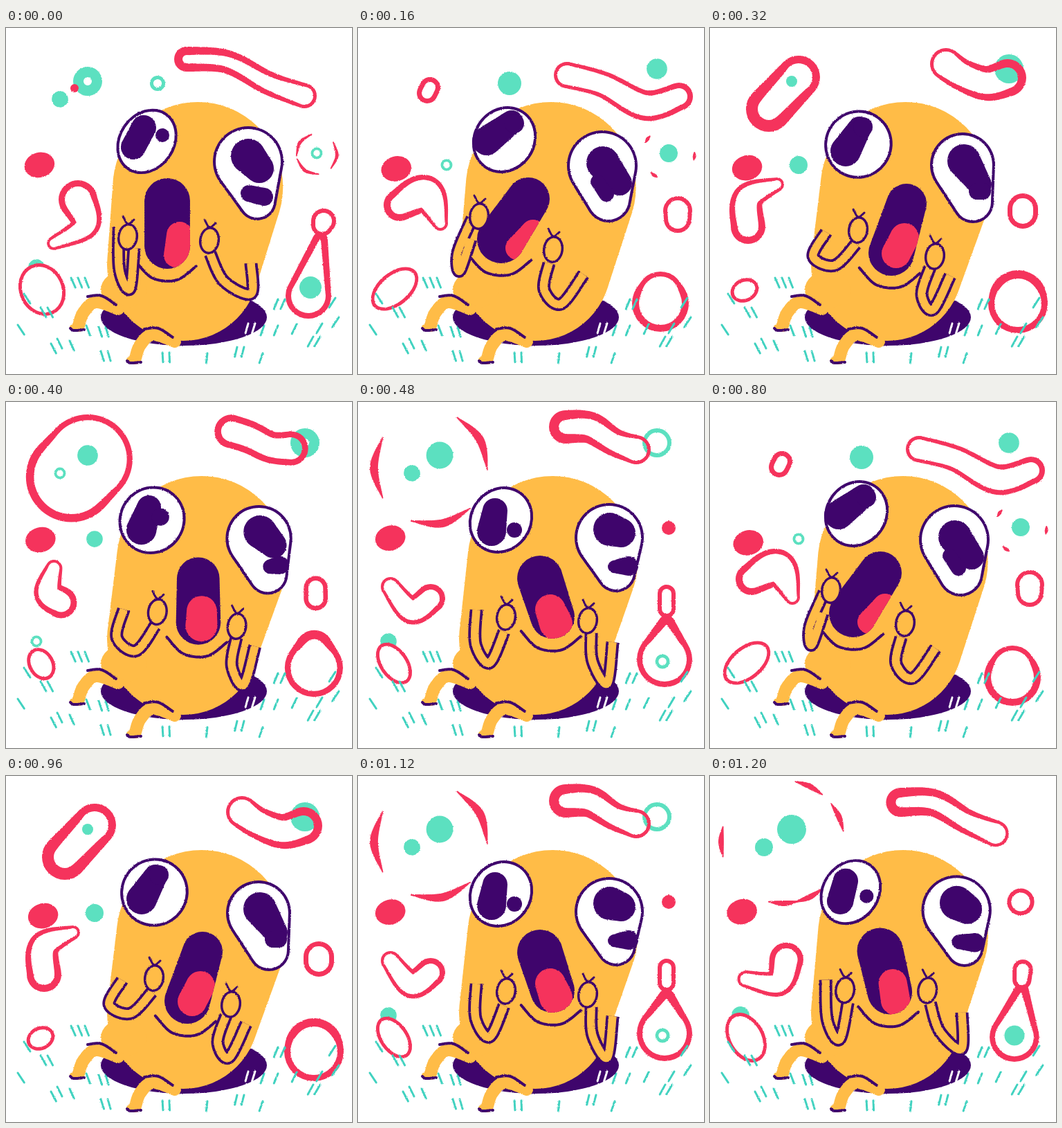
Write an HTML page with a canvas that moves like this. It is 500 px wide and 500 px high and loops after 1.28 s.

```html
<!DOCTYPE html>
<html>
<head>
<meta charset="utf-8">
<style>
html, body { margin: 0; height: 100%; overflow: hidden; background: #fff; }
canvas { display: block; filter: url(#crayon); }
svg { position: absolute; }
</style>
</head>
<body>
<svg width="0" height="0">
  <filter id="crayon" x="0" y="0" width="100%" height="100%" color-interpolation-filters="sRGB">
    <feTurbulence type="fractalNoise" baseFrequency=".7" seed="4"/>
    <feDisplacementMap in="SourceGraphic" scale="2.5" xChannelSelector="R" yChannelSelector="G"/>
  </filter>
</svg>
<canvas width="500" height="500"></canvas>
<script>
const ctx = document.querySelector('canvas').getContext('2d');
const YELLOW = '#ffbc47', PURPLE = '#3f056c', RED = '#f5335c', TEAL = '#5ce0c0', GRASS = '#41d2c0';
const STEP = 80, STEPS = 8, SAMPLES = 20, TAU = Math.PI * 2;
let step = 0;

const { cos, sin, floor, min, max } = Math;
const rad = deg => deg * Math.PI / 180;
const since = start => (step - start + STEPS) % STEPS;
const wave = (lag = 0) => sin((step - lag) / STEPS * TAU);
const cubic = (a, b, c, d, t) =>
  b + t / 2 * (c - a + t * (2 * a - 5 * b + 4 * c - d + t * (3 * (b - c) + d - a)));

// Four key poses spread over the loop, joined by a smooth cycle
function pose(...keys) {
  const i = floor(step / 2), key = k => keys[(i + k + 3) % 4];
  return key(1).map((v, j) => cubic(key(0)[j], v, key(2)[j], key(3)[j], step % 2 / 2));
}

// Samples of a smooth curve through points of `dim` numbers each
function along(flat, dim) {
  const n = flat.length / dim, out = [];
  for (let s = 0; s <= (n - 1) * SAMPLES; s++) {
    const i = floor(s / SAMPLES), t = s % SAMPLES / SAMPLES;
    const at = (k, j) => flat[max(0, min(n - 1, i + k)) * dim + j];
    out.push(Array.from({ length: dim }, (_, j) => cubic(at(-1, j), at(0, j), at(1, j), at(2, j), t)));
  }
  return out;
}

// Circles (x, y, r) swept along a curve; the radius grows by g0 at its start and g1 at its end
function sweep(nodes, g0 = 0, g1 = g0) {
  const path = along(nodes, 3);
  ctx.beginPath();
  path.forEach(([x, y, r], i) => {
    r = max(0, r + g0 + (g1 - g0) * i / max(1, path.length - 1));
    ctx.moveTo(x + r, y);
    ctx.arc(x, y, r, 0, TAU);
  });
}
function blob(nodes, color, g0, g1) {
  sweep(nodes, g0, g1);
  ctx.fillStyle = color;
  ctx.fill();
}
function line(points, color = PURPLE, width = 4) {
  ctx.beginPath();
  along(points, 2).forEach(([x, y]) => ctx.lineTo(x, y));
  ctx.strokeStyle = color;
  ctx.lineWidth = width;
  ctx.stroke();
}
function oval(x, y, rx, ry, deg, color) {
  ctx.beginPath();
  ctx.ellipse(x, y, rx, ry, rad(deg), 0, TAU);
  ctx.fillStyle = color;
  ctx.fill();
}
function blend(mode, paint) {
  ctx.globalCompositeOperation = mode;
  paint();
  ctx.globalCompositeOperation = 'source-over';
}

// The last two numbers are the wall at either end
function ring(p) {
  const nodes = p.slice(0, -2), [w0, w1] = p.slice(-2);
  blob(nodes, RED);
  blend('destination-out', () => blob(nodes, RED, -w0, -w1));
}

// Pieces of a broken circle, thick in the middle
function shatter(cx, cy, radius, angles, span, thick) {
  for (const a of angles) {
    const node = (deg, r) => [cx + radius * cos(rad(deg)), cy + radius * sin(rad(deg)), r];
    blob([...node(a - span, 1), ...node(a, thick), ...node(a + span, 1)], RED);
  }
}

function dot(x, y, r, hole) {
  ctx.beginPath();
  ctx.arc(x, y, r, 0, TAU);
  ctx.moveTo(x + hole, y);
  ctx.arc(x, y, hole, 0, TAU);
  ctx.fillStyle = TEAL;
  ctx.fill('evenodd');
}
// Starts as a small ring, fills up and shrinks away
function bud(x, y, size, birth) {
  const age = since(birth), r = size * cos((age - 2) * .43);
  if (age < 4) dot(x, y, r, age ? 0 : r * .55);
}
// Swells, opens from the middle and is gone
function bubble(x, y, birth) {
  const age = since(birth);
  if (age && age < 7) dot(x, y, 21 * sin(min(1, age / 4) * TAU / 4), max(0, 6 + 9 * (age - 5)));
}

function drawFloaters() {
  bud(44, 346, 13, 5);
  ring(pose(
    [261,45,18, 320,49,17, 380,80,17, 431,98,18, 12,5],
    [302,68,19, 355,82,19, 415,112,22, 464,99,20, 5,8],
    [341,52,23, 365,68,23, 400,80,25, 430,72,27, 5,12],
    [300,36,24, 335,37,23, 370,58,20, 402,69,21, 14,5]));
  ring(pose(
    [454,306,11, 437,387,33, 10,8],
    [437,386,34, 437,398,41, 7,10],
    [445,392,42, 445,398,43, 12,9],
    [446,320,12, 443,372,40, 13,8]));
  ring(pose(
    [459,279,18, 457,285,16, 6,6],
    [462,264,21, 462,276,20, 6,6],
    [452,261,22, 452,268,22, 7,7],
    [446,277,13, 446,299,13, 6,6]));
  ring(pose(
    [104,248,28, 115,285,20, 69,311,10, 9,4],
    [60,256,23, 98,240,27, 119,282,11, 10,4],
    [55,287,25, 55,246,22, 97,226,10, 10,4],
    [105,284,21, 77,301,20, 47,267,14, 8,4]));
  const [x, y, rx, ry, tilt] = pose([52,378,33,39,-25], [53,377,40,24,-40], [50,379,21,17,-25], [52,378,21,34,-35]);
  oval(x, y, rx, ry, tilt, RED);
  blend('destination-out', () => oval(x, y, rx - 5, ry - 5, tilt, RED));
  oval(51 + 5 * wave(.7), 200 + 4 * wave(.7), 22, 18, -15, RED);

  if (step < 6) ring(pose(
    [99,87,6, 99,87,6, 6,6],
    [104,86,15, 100,94,15, 7,7],
    [128,71,31, 85,117,33, 11,17],
    [105,95,86, 105,95,86, 5,5]));
  else if (step === 6) shatter(105, 95, 82, [180, -30, 78], 32, 6);
  else shatter(105, 95, 89, [180, -64, -24, 64, 89], 14, 4);

  // A seed grows into a ring and falls apart
  const age = since(6), size = 42 - 32 * .7 ** age;
  if (age < 2) ring([449, 182, size, age ? 6 : size, 6]);
  else if (age < 5) shatter(449, 182, size + 3, [-145, 5, 125], 72 - 16 * age, 2.5);

  blend('destination-over', () => {
    bubble(118, 77, 3);
    bubble(432, 59, 0);
    bud(78, 103, 13, 5);
    bud(219, 80, 17, 0);
    bud(449, 181, 13, 0);
    bud(128, 198, 13, 2);
    bud(440, 375, 16, 6);
  });
}

// Blades lean towards the middle of the meadow
function tuft(x, y, count, color = GRASS) {
  for (let i = 0; i < count; i++, x += 10) line([x, y, x + (250 - x) * .04, y + 14], color, 3);
}
function drawGrass() {
  [[94,361,3], [17,429,1], [26,384,1], [50,404,2], [65,456,1], [74,449,1], [92,452,1], [116,430,1],
   [134,432,2], [137,467,2], [226,469,2], [291,470,1], [334,461,2], [371,470,1], [373,430,1],
   [393,392,2], [393,430,1], [420,428,1], [444,446,2], [457,427,1], [481,418,1], [476,390,1]]
    .forEach(t => tuft(...t));
}

function drawLeg(dx, dy) {
  ctx.save();
  ctx.translate(dx, dy);
  line([162,406, 130,396, 112,411, 105,430], YELLOW, 18);
  oval(102, 432, 10, 5, 0, YELLOW);
  line([118,388, 138,387, 159,400]);
  line([93,434, 98,437, 113,436]);
  ctx.restore();
}

function drawBody() {
  oval(257, 418, 120, 41, 0, PURPLE);
  tuft(350, 427, 2, '#fff');
  blob([280 - 3 * cos(rad(45 * step - 25)), 230, 123, 256, 342, 110], YELLOW);
  oval(170, 378, 33, 27, 0, YELLOW);
  drawLeg(0, 0);
  drawLeg(82, 47);
}

function drawFace() {
  const turn = rad(45 * step - 155), widen = 4 * cos(rad(45 * step));
  const ex = 209 + 6 * cos(turn), ey = 166 + 5 * sin(turn);
  oval(ex, ey, 45 - widen, 50, 35, PURPLE);
  oval(ex, ey, 41 - widen, 46, 35, '#fff');
  blob(pose([199,144,18, 184,172,18], [222,136,17, 186,163,21], [216,145,17, 196,178,22], [198,157,18, 193,187,21]), PURPLE);
  blob(pose([226,155,10], [226,138,14], [221,143,14], [226,185,11]), PURPLE);

  const eye = pose(
    [350,193,50, 363,250,27], [353,199,50, 362,248,32], [365,198,46, 380,252,29], [363,196,49, 373,246,28]);
  blob(eye, PURPLE, 1);
  blob(eye, '#fff', -3);
  blob(pose([350,185,25, 366,203,21], [354,195,24, 378,224,18], [367,192,24, 390,226,17], [364,184,24, 380,189,21]), PURPLE);
  blob(pose([351,239,12, 373,244,13], [346,222,10, 359,240,11], [386,236,12, 394,236,12], [370,238,9, 391,237,14]), PURPLE);

  const mouth = pose(
    [233,250,33, 233,315,33], [246,247,31, 207,305,35], [284,254,29, 262,325,33], [263,255,33, 281,310,32]);
  const [mx, my, mr] = mouth.slice(3);
  const chin = [35, 75, 115, 155].flatMap(a => [mx + (mr + 18) * cos(rad(a)), my + (mr + 18) * sin(rad(a))]);
  line(chin);
  blob(mouth, PURPLE);
  ctx.save();
  sweep(mouth);
  ctx.clip();
  blob(pose([251,299,19, 246,328,18], [253,295,18, 230,318,17], [281,303,21, 269,326,21], [278,300,22, 286,320,24]), RED);
  ctx.restore();
}

// Shoulder, two elbow points, wrist and the middle of the fist
function drawArm(p) {
  const limb = p.slice(0, 8), [x, y] = p.slice(8);
  ctx.lineCap = 'butt';
  line(limb, PURPLE, 19);
  line(limb, YELLOW, 11.5);
  ctx.lineCap = 'round';
  oval(x, y, 15, 20, 8, PURPLE);
  oval(x, y, 11.5, 16.5, 8, YELLOW);
  line([x - 7, y - 30, x, y - 19, x + 9, y - 25], PURPLE, 3);
}

function draw(time) {
  step = floor(time / STEP) % STEPS;
  ctx.clearRect(0, 0, 500, 500);
  ctx.lineCap = ctx.lineJoin = 'round';
  drawFloaters();
  drawGrass();
  drawBody();
  drawFace();
  drawArm(pose(
    [163,287, 164,350, 179,377, 185,318, 176,302],
    [165,275, 144,325, 147,351, 163,305, 175,272],
    [168,295, 149,330, 180,343, 211,312, 214,292],
    [171,300, 170,350, 190,377, 211,332, 214,311]));
  drawArm(pose(
    [354,340, 354,384, 315,366, 295,326, 294,307],
    [326,356, 293,399, 269,378, 276,340, 282,320],
    [347,358, 322,407, 306,385, 318,346, 325,330],
    [368,347, 360,407, 339,375, 337,334, 332,316]));
  requestAnimationFrame(draw);
}
draw(0);
</script>
</body>
</html>
```
